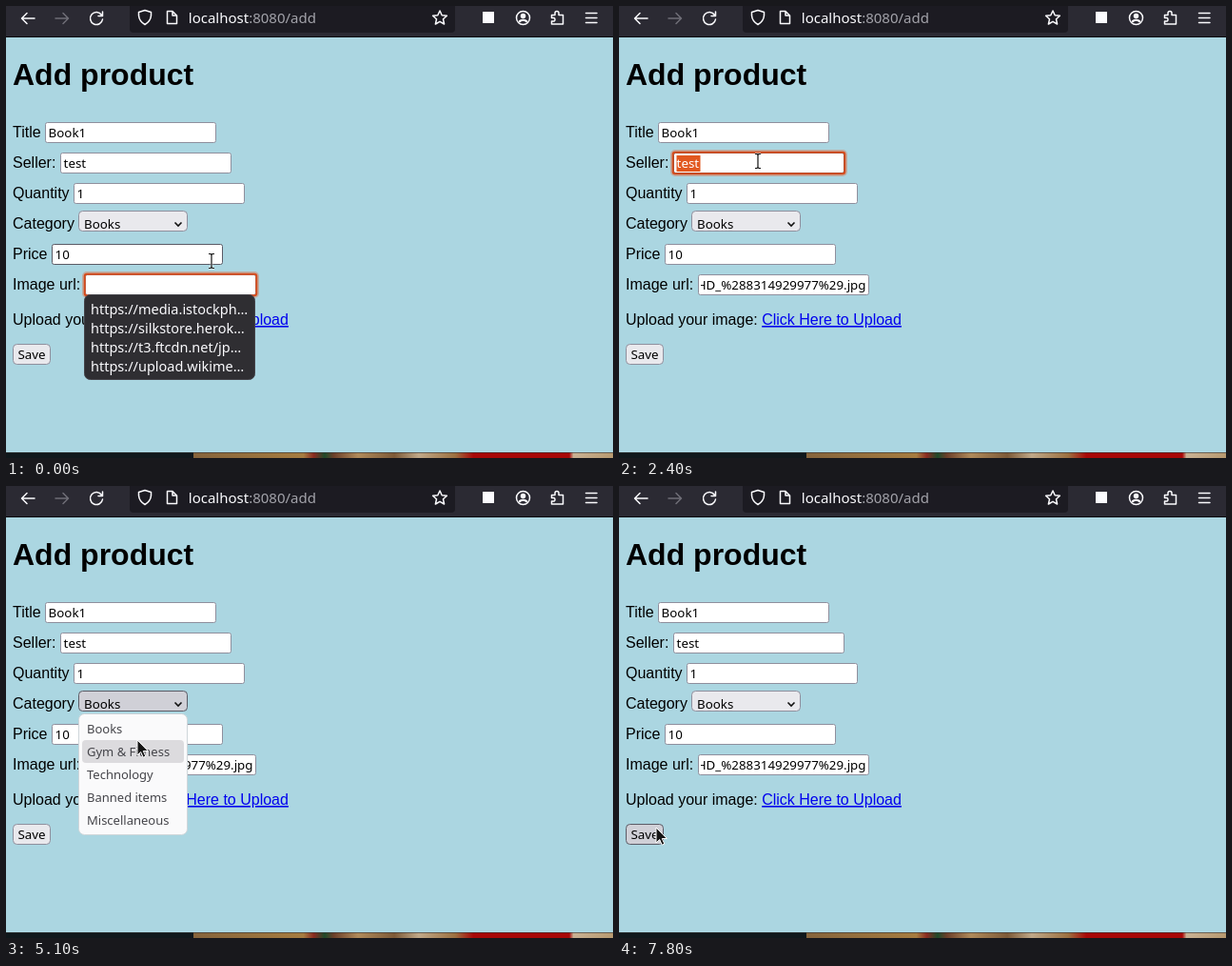
Recreate the animation shown at these times as an HTML page. Size 638x475 px, loop 8 s.

```html
<!DOCTYPE html>
<html lang="en">
<head>
<meta charset="utf-8">
<title>Add product</title>
<style>
  html, body { margin: 0; width: 100%; height: 100%; overflow: hidden; background: #abd6e1; }
  svg { display: block; }
  text { white-space: pre; font: 13.33px "Noto Sans", "Open Sans", sans-serif; }
  .label { font: 16px "Liberation Sans", Arial, sans-serif; }
  .title { font: bold 32px "Liberation Sans", Arial, sans-serif; }
  .url { font-size: 15px; }
  .hint { font-size: 14.5px; fill: #fbfbfe; }
  .item { font-size: 13px; fill: #45454a; }
  .link { fill: #00e; text-decoration: underline; }
  .icon { fill: none; stroke: #fbfbfe; stroke-width: 1.5; stroke-linecap: round; stroke-linejoin: round; }
</style>
</head>
<body>
<svg width="638" height="475" viewBox="0 0 638 475">
  <defs>
    <linearGradient id="strip">
      <stop offset="0" stop-color="#10181c"/>
      <stop offset=".308" stop-color="#10181c"/>
      <stop offset=".309" stop-color="#86643c"/>
      <stop offset=".49" stop-color="#a67c40"/>
      <stop offset=".507" stop-color="#8a2a20"/>
      <stop offset=".525" stop-color="#1e4a2a"/>
      <stop offset=".54" stop-color="#6b3f2a"/>
      <stop offset=".58" stop-color="#b08a5a"/>
      <stop offset=".64" stop-color="#7d5a38"/>
      <stop offset=".68" stop-color="#c0a888"/>
      <stop offset=".74" stop-color="#9c7040"/>
      <stop offset=".77" stop-color="#a80808"/>
      <stop offset=".928" stop-color="#a80808"/>
      <stop offset=".935" stop-color="#c9b193"/>
      <stop offset="1" stop-color="#b89a70"/>
    </linearGradient>
  </defs>

  <rect width="638" height="475" fill="#abd6e1"/>
  <rect y="469" width="638" height="6" fill="url(#strip)"/>
  <rect y="469" width="638" height="1" fill="#333" opacity=".6"/>

  <!-- browser toolbar -->
  <rect width="638" height="33" fill="#2b2a33"/>
  <rect y="32" width="638" height="1" fill="#0c0c0f"/>
  <rect x="130" y="-8" width="342" height="36" rx="4" fill="#1c1b22"/>
  <g class="icon">
    <path d="M30 13H17M22 7.5L16.500 13L22 18.500"/>
    <path d="M52 13H65M60 7.500L65.500 13L60 18.500" stroke="#6f6e77"/>
    <path d="M100.500 9.500A6.500 6.500 0 1 0 101.500 14M101.500 6V10.500H97"/>
    <path d="M146 4.500L152.500 6.500V10Q152 16 146 19.500Q140 16 139.500 10V6.500Z"/>
    <path d="M169.500 5.500H175L179.500 10V18.500H169.500ZM175 5.500V10H179.500"/>
    <path d="M456 5L458.200 9.800L463.400 10.300L459.500 13.800L460.600 19L456 16.300L451.400 19L452.500 13.800L448.600 10.300L453.800 9.800Z"/>
    <circle cx="543.500" cy="12.500" r="7"/>
    <circle cx="543.500" cy="10.500" r="2" fill="#fbfbfe"/>
    <path d="M540 16Q543.500 13.500 547 16" stroke-width="2.200"/>
    <path d="M573.500 9.500H577V7.500A2 2 0 0 1 581 7.500V9.500H585.500V19H573.500V16H576A2 2 0 0 0 576 12.500H573.500Z"/>
    <path d="M609.500 7.500H621M609.500 12.500H621M609.500 17.500H621"/>
  </g>
  <rect x="501" y="6" width="12" height="12" fill="#fbfbfe"/>
  <text class="url" x="191.800" y="18" fill="#fbfbfe">localhost<tspan fill="#a3a3aa">:8080/add</tspan></text>

  <text class="title" x="7" y="83">Add product</text>
  <text class="label" x="7" y="335">Upload your image: <tspan class="link">Click Here to Upload</tspan></text>
  <g id="live"></g>
</svg>

<script>
const LOOP = 8000;
const live = document.getElementById('live');

// label, left edge of the field, value
const fields = [
  ['Title', 41, 'Book1'],
  ['Seller:', 57, 'test'],
  ['Quantity', 71, '1'],
  ['Category', 77, 'Books'],
  ['Price', 48, '10'],
  ['Image url:', 83, 'HD_%288314929977%29.jpg']
];
const SELLER = 1, CATEGORY = 3, IMAGE = 5;
const hints = ['media.istockph…', 'silkstore.herok…', 't3.ftcdn.net/jp…', 'upload.wikime…'];
const items = ['Books', 'Gym &amp; Fitness', 'Technology', 'Banned items', 'Miscellaneous'];

// pointer stops: time, x, y
const stops = [
  [0, 216, 268], [100, 232, 277], [200, 250, 292], [300, 264, 308], [400, 270, 318],
  [1000, 269, 316], [1500, 212, 271], [1600, 216, 258], [1700, 221, 232], [1800, 226, 199],
  [1900, 229, 170], [2000, 229, 165], [2400, 146, 163], [2800, 229, 165], [3200, 146, 163],
  [3900, 138, 203], [4000, 140, 205], [4200, 141, 223], [4300, 141, 228], [4500, 143, 233],
  [4600, 142, 238], [4800, 140, 337], [5100, 138, 267], [5200, 141, 349], [5300, 140, 300],
  [5400, 139, 258], [5900, 222, 266], [6100, 214, 290], [6200, 201, 318], [6300, 200, 322],
  [6500, 192, 329], [6600, 176, 344], [6700, 160, 358], [6800, 150, 367]
];

function pointer(t) {
  if (t >= 7200) {
    const k = Math.min(7, 1 + Math.floor((t - 7200) / 100)) / 7;
    const e = k * k * (3 - 2 * k);
    return [150 - 111 * e, 367 - 8 * e];
  }
  return stops.findLast(s => s[0] <= t).slice(1);
}

const within = (t, a, b) => t >= a && t < b;
const text = (x, y, s, attrs = '') => `<text x="${x}" y="${y}" ${attrs}>${s}</text>`;
const box = (x, y, w, h, r, fill, stroke) =>
  `<rect x="${x + .5}" y="${y + .5}" width="${w - 1}" height="${h - 1}" rx="${r}" fill="${fill}" stroke="${stroke}"/>`;
const edge = hot => hot ? '#5b5b66' : '#8f8f9d';
const face = hot => hot ? '#d0d0d7' : '#e9e9ed';

function ring(x, y, w, h) {
  const line = (d, color) =>
    `<rect x="${x - d}" y="${y - d}" width="${w + 2 * d}" height="${h + 2 * d}" rx="${2 + d}" fill="none" stroke="${color}" stroke-width="2"/>`;
  return line(2, '#e9542055') + line(.3, '#d84c1c');
}

function cursor(kind, x, y) {
  const beam = 'M-3-7.5H-1L0-6.500L1-7.500H3M0-6.500V6.500M-3 7.500H-1L0 6.500L1 7.500H3';
  const shapes = {
    arrow: '<path d="M0 0V16L3.700 12.500L6.200 18.200L8.800 17.100L6.300 11.500H11.300Z" fill="#151515" stroke="#fff"/>',
    beam: `<path d="${beam}" fill="none" stroke="#fff" stroke-width="2.600" opacity=".7"/>
           <path d="${beam}" fill="none" stroke="#111" stroke-width="1.200"/>`,
    hand: '<path d="M-1.600 10V1.600a1.600 1.600 0 0 1 3.200 0V6.500q1.500-1 2.800 .3q1.600-.8 2.700 .6q2-.5 2.200 1.400v3q0 2-1.500 4.200h-7.500q-2.500-3.500-5-6.500q0-2 1.800-1z" fill="#fff" stroke="#111"/>'
  };
  return `<g transform="translate(${x} ${y})">${shapes[kind]}</g>`;
}

function draw(t) {
  const [px, py] = pointer(t);
  const menu = within(t, 4300, 5600);
  const hintCount = t < 200 ? 4 : within(t, 900, 1900) ? 1 : 0;
  const focus = t < 1900 ? IMAGE : t < 4200 ? SELLER : -1;
  const selected = within(t, 2400, 2800);
  let kind = 'arrow', out = '';

  fields.forEach(([label, x, value], i) => {
    const base = 138 + 32 * i, top = base - 16;
    out += text(7, base, label, 'class="label"');
    if (i === CATEGORY) {
      const hot = menu || (within(px, x, 191) && within(py, top - 3, top + 20));
      out += box(x - 1, top - 4 + 1, 115, 22, 4, face(hot), edge(hot))
        + text(82, base, value)
        + '<path d="M177.500 227.500L181 231L184.500 227.500" fill="none" stroke="#111" stroke-width="1.600"/>';
      return;
    }
    const hot = !menu && within(px, x, x + 180) && within(py, top, top + 20);
    if (hot) kind = 'beam';
    out += box(x, top, 180, 22, 2, '#fff', edge(hot));
    if (i === focus) out += ring(x, top, 180, 22);
    if (i === IMAGE) {
      if (t >= 800) out += `<svg x="86" y="${top}" width="175" height="22">${text(173.500, 16, value, 'text-anchor="end"')}</svg>`;
      if (within(t, 800, 1900)) out += `<rect x="259" y="285" width="1" height="16"/>`;
    } else {
      const mark = i === SELLER && selected;
      if (mark) out += '<rect x="60.500" y="157" width="25" height="17" fill="#e2581f"/>';
      out += text(x + 3.600, base, value, mark ? 'fill="#fff"' : '');
    }
  });

  const onSave = within(px, 7, 47) && within(py, 355, 377);
  out += box(7, 355, 40, 22, 4, face(onSave), edge(onSave)) + text(12.500, 371, 'Save');

  if (hintCount) {
    out += box(82, 303, 180, 10 + 20 * hintCount, 6, '#2f2e32', '#444349');
    hints.slice(-hintCount).forEach((h, i) => out += text(89, 324 + 20 * i, 'https://' + h, 'class="hint"'));
  }

  if (menu) {
    out += box(76, 239, 115, 128, 6, '#fafafb', '#cfd6da');
    const over = Math.floor((py - 243) / 24);
    if (over >= 0) out += `<rect x="80" y="${243 + 24 * over}" width="107" height="24" rx="4" fill="#dcdbde"/>`;
    items.forEach((s, i) => out += text(85, 260 + 24 * i, s, 'class="item"'));
  }

  // link address panel
  if (within(t, 6300, 6600)) {
    out += box(-4, 452, 337, 30, 4, '#2b2a33', '#45444c')
      + text(6, 470, 'https://www.example.com/upload-your-image', 'class="hint"');
  }

  if (within(px, 150, 297) && within(py, 317, 340) && t > 6000) kind = 'hand';
  return out + cursor(kind, px, py);
}

let shown = '';
function tick() {
  const next = draw(performance.now() % LOOP);
  if (next !== shown) live.innerHTML = shown = next;
  requestAnimationFrame(tick);
}
tick();
</script>
</body>
</html>
```
